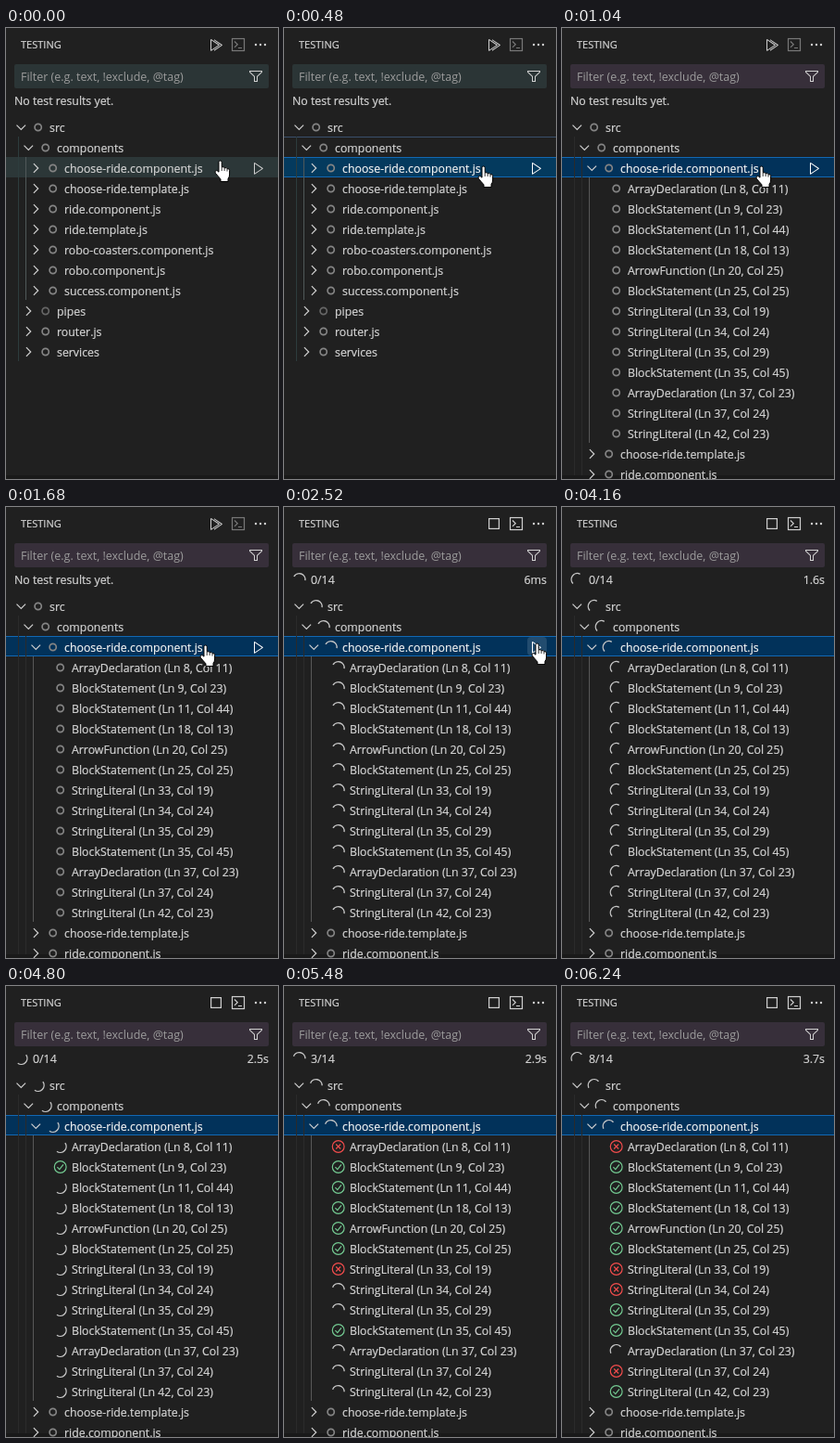
Write an HTML page that moves like this. It is 294 by 486 pixels and loops after 6.28 s.

```html
<!DOCTYPE html>
<html lang="en">
<head>
<meta charset="utf-8">
<title>Testing panel</title>
<style>
  html, body { margin: 0; width: 100%; height: 100%; overflow: hidden; background: #202020; }
  svg { display: block; }
  text { font: 12.35px "Open Sans", "Noto Sans", sans-serif; fill: #d4d4d4; stroke: #d4d4d4; stroke-width: .2px; white-space: pre; }
  .title { font-size: 11px; }
  .hint { font-size: 12.5px; fill: #9c9c9c; stroke: none; }
  .tip { font-size: 11.4px; }
  .line { fill: none; stroke: #d0d0d0; stroke-width: 1.2; }
  .solid { fill: #d0d0d0; }
</style>
</head>
<body>
<svg id="stage" width="294" height="486" viewBox="0 0 294 486">
  <defs>
    <circle id="ring" r="3.6" fill="none" stroke="#848484" stroke-width="1.7"/>
    <path id="spin" d="M-6.4-1A6.5 6.5 0 0 1 6.4-1" fill="none" stroke="#c5c5c5" stroke-width="1.4"/>
    <g id="pass" fill="none" stroke="#73c991" stroke-width="1.2">
      <circle r="6.4"/><path d="M-3.3.2-.9 2.6 3.3-2.6"/>
    </g>
    <g id="fail" fill="none" stroke="#f14c4c" stroke-width="1.2">
      <circle r="6.4"/><path d="M-2.5-2.5 2.5 2.5M2.5-2.5-2.5 2.5"/>
    </g>
    <path id="open" d="M-4.8-2.3 0 2.5 4.8-2.3" class="line"/>
    <path id="shut" d="M-2.4-4.8 2.4 0-2.4 4.8" class="line"/>
    <path id="play" d="M3.78 2 3 2.41v12l.78.42 9-6V8l-9-6zM4 13.48V3.35l7.6 5.07L4 13.48z"/>
  </defs>

  <rect width="294" height="486" fill="#202020"/>
  <rect y="482" width="294" height="4" fill="#191919"/>

  <text class="title" x="16" y="22">TESTING</text>
  <path id="runAll" class="solid" transform="translate(219 10)" d="M2.78 2 2 2.41v12l.78.42 9-6V8l-9-6zM3 13.48V3.35l7.6 5.07L3 13.48zM6 14.68l8.78-5.85V8L6 2.15v1.2l7.6 5.07L6 13.48z"/>
  <rect id="stop" class="line" x="221.6" y="12.6" width="10.8" height="10.8"/>
  <g id="output" class="line">
    <rect x="244.5" y="11.5" width="13" height="13"/>
    <path d="M247 14.5 250.2 17.7 247 20.9M251 21.5h4"/>
  </g>
  <g class="solid"><circle cx="270" cy="18" r="1.2"/><circle cx="275" cy="18" r="1.2"/><circle cx="280" cy="18" r="1.2"/></g>

  <rect id="field" x="9" y="39" width="275" height="26" rx="2"/>
  <text class="hint" x="16" y="57">Filter (e.g. text, !exclude, @tag)</text>
  <path class="solid" transform="translate(262 44)" d="M15 2v1.67L10 8.43V14H6V8.43L1 3.67V2h14zM7 8v5h2V8l5-4.76V3H2v.24L7 8z"/>

  <text id="empty" x="9" y="83">No test results yet.</text>
  <g id="status">
    <use href="#spin" x="16.5" y="78"/>
    <text id="count" x="29" y="83"></text>
    <text id="clock" x="284" y="83" text-anchor="end"></text>
  </g>

  <rect id="parentLine" y="117" width="294" height="1" fill="#3a4f6b"/>
  <rect id="active" y="139" width="294" height="22"/>
  <g id="focus" fill="#1268b3"><rect y="139" width="294" height="1"/><rect y="160" width="294" height="1"/></g>

  <g id="top"></g>
  <g id="collapsed"></g>
  <g id="expanded"></g>

  <g id="rowPlay">
    <rect id="playHover" x="263" y="140" width="21" height="20" rx="4" fill="#fff" opacity=".13"/>
    <use id="playIcon" href="#play" x="265" y="143"/>
  </g>
  <g id="tooltip">
    <rect x="244.5" y="163.5" width="66" height="23" rx="3" fill="#202020" stroke="#454545"/>
    <text class="tip" x="253" y="179">Run Test</text>
  </g>
  <g id="hand">
    <path d="M5 13.2V2.6a1.6 1.6 0 0 1 3.2 0v5.2q2.6-.6 2.9 1 2.6-.7 2.9.9 2.6-.6 2.6 1.6V16q0 2.5-1.6 4.5v3H7v-2.6Q4.5 18 1.2 14.2q-.9-2 1-2.6 1.3 0 2.8 1.6z" fill="#fff" stroke="#000"/>
    <path d="M8.2 8v4M11.1 9v3M14 10v2.5" fill="none" stroke="#000" stroke-width=".8"/>
  </g>
</svg>
<script>
const LOOP = 6280, STEP = 40;
const SELECT = 320, EXPAND = 840, RUN = 2250, LEAVE = 3480;
const SVG = 'http://www.w3.org/2000/svg';
const $ = id => document.getElementById(id);

// name, line, column, result, finishing time
const tests = [
  ['ArrayDeclaration', 8, 11, 'fail', 4960],
  ['BlockStatement', 9, 23, 'pass', 4800],
  ['BlockStatement', 11, 44, 'pass', 5080],
  ['BlockStatement', 18, 13, 'pass', 5160],
  ['ArrowFunction', 20, 25, 'pass', 5240],
  ['BlockStatement', 25, 25, 'pass', 5320],
  ['StringLiteral', 33, 19, 'fail', 5440],
  ['StringLiteral', 34, 24, 'fail', 6000],
  ['StringLiteral', 35, 29, 'pass', 6080],
  ['BlockStatement', 35, 45, 'pass', 5360],
  ['ArrayDeclaration', 37, 23, 'spin', LOOP],
  ['StringLiteral', 37, 24, 'fail', 6120],
  ['StringLiteral', 42, 23, 'pass', 6200]
];

function add(parent, tag, attrs) {
  const el = document.createElementNS(SVG, tag);
  for (const key in attrs) el.setAttribute(key, attrs[key]);
  return parent.appendChild(el);
}

// Tree row: level sets the indent, y is the row's middle.
function row(parent, level, y, label, arrow) {
  const x = level * 8;
  const twist = arrow && add(parent, 'use', { href: '#' + arrow, x: 16.3 + x, y });
  const icon = add(parent, 'use', { href: '#ring', x: 34.7 + x, y });
  const text = add(parent, 'text', { x: 47 + x, y: y + 5 });
  text.textContent = label;
  return { twist, icon, text };
}

function guide(parent, x, y, end, fill) {
  return add(parent, 'rect', { x, y, width: 1, height: end - y, fill });
}

const parents = [
  row($('top'), 0, 107, 'src', 'open'),
  row($('top'), 1, 129, 'components', 'open'),
  row($('top'), 2, 151, 'choose-ride.component.js', 'shut')
];
const main = parents[2];

guide($('collapsed'), 13, 117, 359, '#2d3c3d');
guide($('collapsed'), 21, 139, 293, '#505859');
[
  'choose-ride.template.js', 'ride.component.js', 'ride.template.js',
  'robo-coasters.component.js', 'robo.component.js', 'success.component.js'
].forEach((name, i) => row($('collapsed'), 2, 173 + i * 22, name, 'shut'));
['pipes', 'router.js', 'services'].forEach((name, i) => {
  const { icon } = row($('collapsed'), 1, 305 + i * 22, name, 'shut');
  if (!i) icon.setAttribute('opacity', .7);
});

guide($('expanded'), 13, 117, 482, '#2b2b2b');
guide($('expanded'), 21, 139, 482, '#2b2b2b');
guide($('expanded'), 29, 161, 447, '#585858');
const leaves = tests.map(([name, ln, col], i) =>
  row($('expanded'), 3, 173 + i * 22, `${name} (Ln ${ln}, Col ${col})`));
row($('expanded'), 2, 459, 'choose-ride.template.js', 'shut');
row($('expanded'), 2, 481, 'ride.component.js', 'shut');

// Hand positions: time, x, y
const path = [
  [40, 225, 142], [400, 209, 148], [1800, 209, 148], [2120, 267, 146],
  [LEAVE, 267, 146], [3880, 300, 190]
];

function handAt(t) {
  const i = path.findIndex(p => p[0] > t);
  if (i === 0) return path[0].slice(1);
  if (i < 0) return path[path.length - 1].slice(1);
  const [t0, x0, y0] = path[i - 1], [t1, x1, y1] = path[i];
  const k = (t - t0) / (t1 - t0), e = k * k * (3 - 2 * k);
  return [x0 + (x1 - x0) * e, y0 + (y1 - y0) * e];
}

// Slow, fast, slow turn: cubic-bezier(.53, .21, .29, .67)
function turn(x) {
  const curve = (a, b, s) => 3 * (1 - s) ** 2 * s * a + 3 * (1 - s) * s * s * b + s ** 3;
  let lo = 0, hi = 1;
  for (let i = 0; i < 20; i++) {
    const mid = (lo + hi) / 2;
    if (curve(.53, .29, mid) < x) lo = mid; else hi = mid;
  }
  return 360 * curve(.21, .67, lo);
}

const show = (id, on) => $(id).setAttribute('display', on ? 'inline' : 'none');
const paint = (el, fill) => { el.style.fill = fill; };
const setIcon = (r, name) => r.icon.setAttribute('href', '#' + name);

function render(t) {
  const selected = t >= SELECT, expanded = t >= EXPAND, running = t >= RUN;

  show('runAll', !running);
  show('stop', running);
  $('output').setAttribute('opacity', running ? 1 : .5);
  paint($('field'), expanded ? '#372f3a' : '#2b3536');
  show('empty', !running);
  show('status', running);

  show('parentLine', selected && !expanded);
  show('focus', selected);
  paint($('active'), expanded ? '#02325a' : selected ? '#043a5e' : '#2c3738');
  paint(main.text, selected ? '#fff' : '#d4d4d4');
  main.twist.setAttribute('href', expanded ? '#open' : '#shut');
  show('collapsed', !expanded);
  show('expanded', expanded);

  parents.forEach(r => setIcon(r, running ? 'spin' : 'ring'));
  tests.forEach((test, i) =>
    setIcon(leaves[i], !running ? 'ring' : t >= test[4] ? test[3] : 'spin'));
  $('spin').setAttribute('transform', `rotate(${turn((t + 590) % 1000 / 1000)})`);

  if (running) {
    // The summary refreshes only every 410 ms.
    const spent = Math.floor((t - RUN) / 410) * 410 + 6;
    const done = tests.filter(test => test[4] <= RUN + spent).length;
    $('count').textContent = `${done}/14`;
    $('clock').textContent = spent < 1000 ? `${spent}ms` : `${(spent / 1000).toFixed(1)}s`;
  }

  const [x, y] = handAt(t);
  $('hand').setAttribute('transform', `translate(${x} ${y})`);
  show('rowPlay', t < 3760);
  show('playHover', t >= 2040 && t < 3640);
  paint($('playIcon'), selected ? '#fff' : '#d0d0d0');
  show('tooltip', t >= 2600 && t < 3600);
}

const start = performance.now();
function frame() {
  const t = (performance.now() - start) % LOOP;
  render(Math.floor(t / STEP) * STEP);
  requestAnimationFrame(frame);
}
frame();
</script>
</body>
</html>
```
